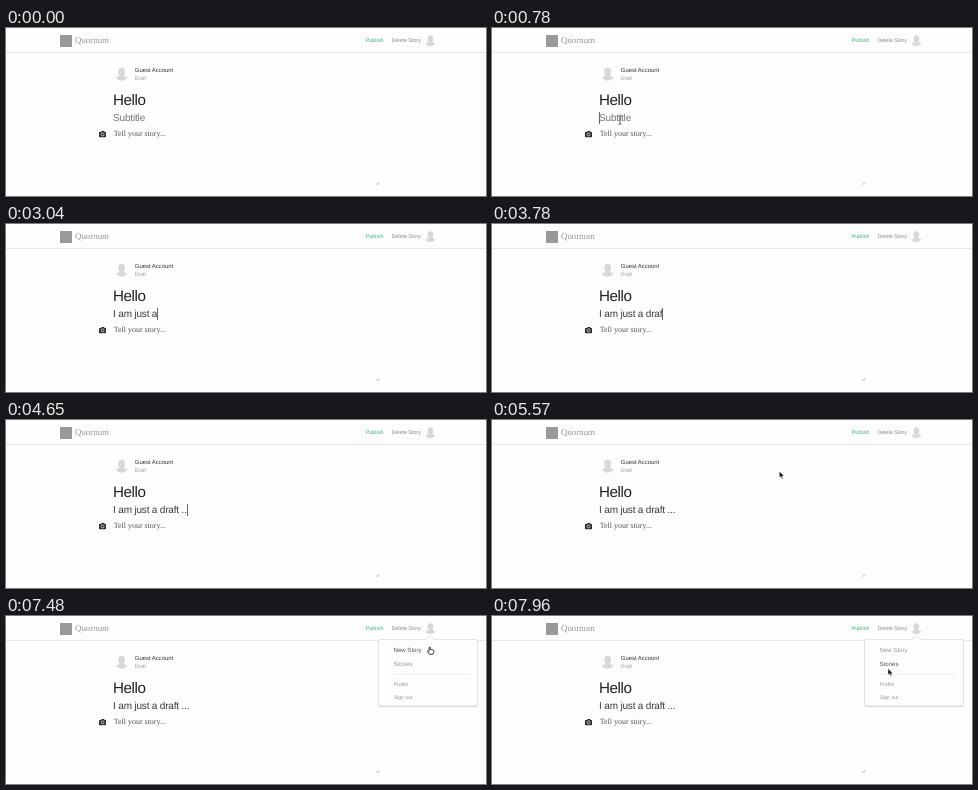
An HTML page that plays this animation: 480 px wide and 168 px high, repeating every 8 s.

```html
<!DOCTYPE html>
<html lang="en">
<head>
<meta charset="utf-8">
<title>Story editor</title>
<style>
html, body { margin: 0; width: 100%; height: 100%; overflow: hidden; background: #eee; }
svg { display: block; width: 480px; height: 168px; }
text { font-family: "Liberation Sans", Arial, sans-serif; text-rendering: geometricPrecision; white-space: pre; fill: #999; }
.serif { font-family: "Liberation Serif", Times, serif; }
.nav { font-size: 5.36px; }
.item { font-size: 6.05px; }
.small { font-size: 5.15px; }
.sub { font-size: 10px; letter-spacing: -.18px; }
</style>
</head>
<body>
<svg viewBox="0 0 480 168">
  <defs>
    <clipPath id="round"><circle r="6.8"/></clipPath>
    <g id="avatar" clip-path="url(#round)" fill="#d8d8da">
      <ellipse cy="-2" rx="3.4" ry="4.3"/>
      <path d="M-7 7V4.2C-5.5 2.8-2.2 3.2-2 1H2C2.2 3.2 5.5 2.8 7 4.2V7Z"/>
    </g>
  </defs>
  <rect width="480" height="168" rx="3" fill="#fdfcfe"/>
  <path d="M0 24.5H480" stroke="#e6e5e7"/>

  <rect x="54" y="7" width="12" height="12" fill="#999"/>
  <text class="serif" x="69" y="15.4" font-size="8.9">Quornum</text>
  <text class="nav" x="359.8" y="14.1" style="fill:#3db26b">Publish</text>
  <text class="nav" x="385.4" y="14.1" style="fill:#888">Delete Story</text>
  <use href="#avatar" transform="translate(424.4 12.5) scale(.85)"/>

  <use href="#avatar" x="115.6" y="46"/>
  <text x="128.8" y="43.9" font-size="5.9" style="fill:#333">Guest Account</text>
  <text x="128.8" y="51.7" font-size="5.1">Draft</text>
  <text x="106.9" y="77" font-size="15.2" letter-spacing="-.4" style="fill:#222">Hello</text>
  <text class="sub" id="hint" x="107.1" y="93.3" style="fill:#777">Subtitle</text>
  <text class="sub" id="typed" x="107.1" y="93.3" style="fill:#3a3a3a"></text>
  <rect id="caret" y="84" width="1" height="12" fill="#666"/>
  <text class="serif" x="107.8" y="108.4" font-size="7.95" style="fill:#555">Tell your story...</text>

  <path d="M93.8 104H95L95.7 102.9H98L98.7 104H99.3Q100 104 100 104.7V108.6Q100 109.3 99.3 109.3H93.8Q93 109.3 93 108.6V104.7Q93 104 93.8 104Z" fill="#2b2b2b"/>
  <circle cx="96.6" cy="106.4" r="1.5" fill="none" stroke="#fdfcfe" stroke-width=".7"/>
  <path d="M370.6 156.6L373 154.2M372 156.6L373 155.6" stroke="#999" stroke-width=".7"/>

  <g id="menu">
    <rect x="372.5" y="24.5" width="99" height="66.3" rx="1.5" fill="#ccc"/>
    <path d="M374 23.5H420.5L424.4 20 428.3 23.5H470Q471.5 23.5 471.5 25V88.5Q471.5 90 470 90H374Q372.5 90 372.5 88.5V25Q372.5 23.5 374 23.5Z" fill="#fdfcfe" stroke="#dcdcdc" stroke-width=".7"/>
    <text class="item" id="newStory" x="387.6" y="36.1">New Story</text>
    <text class="item" id="stories" x="387.6" y="49.6">Stories</text>
    <path d="M388 58.5H464" stroke="#eee" stroke-width=".8"/>
    <text class="small" x="387.7" y="70.4">Profile</text>
    <text class="small" x="387.7" y="82.8">Sign out</text>
  </g>

  <path id="beam" d="M-1.6-4.3Q0-4.3 0-3.3 0-4.3 1.6-4.3M0-3.3V3.3M-1.6 4.3Q0 4.3 0 3.3 0 4.3 1.6 4.3" fill="none" stroke="#444" stroke-width=".8"/>
  <path id="arrow" d="M0 0V6.6L1.6 5.3 2.7 7.8 3.9 7.3 2.8 4.9H4.9Z" fill="#111" stroke="#fff" stroke-width=".5"/>
  <path id="hand" d="M-.7.7Q0-.2.7.7V2.8Q1.5 2.3 2 3 2.8 2.6 3.2 3.3 4.2 3.1 4.2 4.2 4.2 6 3.2 7.4H-.4Q-1.3 5.8-2.3 4.7-2.2 3.7-1.3 4.1L-.7 4.6Z" fill="#fff" stroke="#222" stroke-width=".9" stroke-linejoin="round"/>
</svg>
<script>
const LOOP = 8000, STEP = 1000 / 23;
const STORY = "I am just a draft ...";
const $ = id => document.getElementById(id);

// The pointer rests between eased moves
const HOME = [175.5, 125.5];
const MOVES = [
  { from: 260, to: 740, x: 128, y: 92 },
  { from: 5370, to: 5590, x: 291, y: 50.2 },
  { from: 5740, to: 5915, x: 388.5, y: 25.5 },
  { from: 6050, to: 6290, x: 421.8, y: 14.5 },
  { from: 7350, to: 7500, x: 423.8, y: 31.4 },
  { from: 7540, to: 7840, x: 401, y: 57 },
  { from: 7840, to: 7965, x: 396, y: 52.5 }
];

const show = (id, on) => $(id).style.display = on ? "" : "none";
const within = (t, a, b) => t >= a && t < b;
const progress = (t, a, b) => Math.min(1, Math.max(0, (t - a) / (b - a)));
const ease = f => f * f * (3 - 2 * f);

function pointer(t) {
  let [x, y] = HOME;
  for (const m of MOVES) {
    const f = ease(progress(t, m.from, m.to));
    x += (m.x - x) * f;
    y += (m.y - y) * f;
  }
  return [x, y];
}

function pointerKind(t) {
  if (within(t, 260, 1520) || within(t, 5390, 5480)) return "beam";
  if (within(t, 6200, 7830)) return "hand";
  return t >= 5480 ? "arrow" : "";
}

// Steady typing, then the three dots more slowly
function typedCount(t) {
  if (t < 1520) return 0;
  const words = Math.min(18, 1 + Math.floor((t - 1520) / 150));
  const dots = Math.min(3, Math.max(0, 1 + Math.floor((t - 4430) / 220)));
  return words + dots;
}

function draw(t) {
  const count = typedCount(t);
  $("typed").textContent = STORY.slice(0, count);
  show("hint", !count);
  show("caret", within(t, 740, 1220) || within(t, 1520, 5390) || within(t, 5870, 6390));
  const width = count ? $("typed").getComputedTextLength() : 0;
  $("caret").setAttribute("x", Math.floor(107.4 + width));

  const open = progress(t, 6790, 6960);
  show("menu", open > 0);
  $("menu").style.opacity = open;
  $("menu").setAttribute("transform", `translate(0 ${-20 * (1 - open) ** 2})`);
  $("newStory").style.fill = within(t, 7430, 7640) ? "#555" : "#999";
  $("stories").style.fill = t >= 7640 ? "#555" : "#999";

  const kind = pointerKind(t), [x, y] = pointer(t);
  for (const id of ["beam", "arrow", "hand"]) show(id, id === kind);
  if (kind) $(kind).setAttribute("transform", `translate(${x} ${y})`);
}

const start = performance.now();
function tick() {
  const t = (performance.now() - start) % LOOP;
  draw(Math.floor((t + 5) / STEP) * STEP + 5);
  requestAnimationFrame(tick);
}
tick();
</script>
</body>
</html>
```
